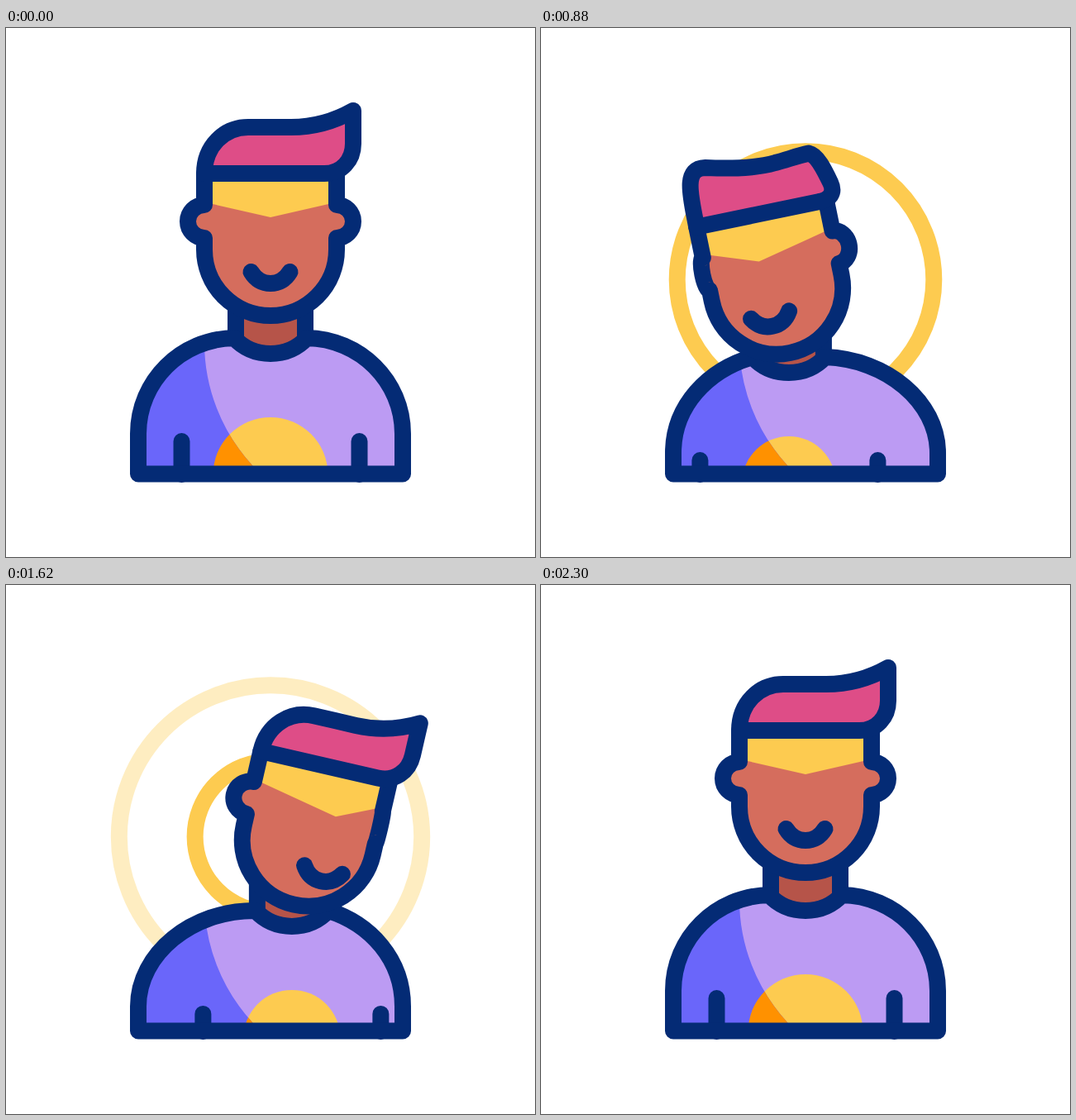
An HTML page for the animation above (2400 ms loop, 640 by 640 pixels).

```html
<!DOCTYPE html>
<html lang="en">
<head>
<meta charset="utf-8">
<title>Tilting figure</title>
<style>
  html, body { margin: 0; width: 100%; height: 100%; overflow: hidden; background: #fff; }
  svg { display: block; width: 100%; height: 100%; }
  .line { fill: none; stroke: #042b75; stroke-width: 20; stroke-linecap: round; stroke-linejoin: round; }
</style>
</head>
<body>
<svg viewBox="0 0 640 640">
  <defs>
    <clipPath id="bodyClip"><path id="bodyShape"/></clipPath>
    <clipPath id="shadeClip"><path d="M100 600V300H240V380A220 220 0 0 0 298 529L340 600Z"/></clipPath>
  </defs>
  <g id="rings" fill="none" stroke="#fdcb50" stroke-width="20">
    <circle cx="320" cy="304.5"/><circle cx="320" cy="304.5"/><circle cx="320" cy="304.5"/>
  </g>
  <g id="neck">
    <path fill="#b65449" d="M278 330V376C290 388 304 394 320 394S350 388 362 376V330Z"/>
    <path class="line" d="M278 335V375M362 335V375"/>
  </g>
  <g clip-path="url(#bodyClip)">
    <rect x="140" y="340" width="360" height="210" fill="#bc9bf3"/>
    <circle class="sun" fill="#fdcb50"/>
    <g clip-path="url(#shadeClip)">
      <rect x="140" y="340" width="160" height="210" fill="#6a66fa"/>
      <circle class="sun" fill="#ff9100"/>
    </g>
  </g>
  <path id="arms" class="line"/>
  <path id="bodyLine" class="line"/>
  <g id="head">
    <path id="face" fill="#d56d5d"/>
    <path id="fringe" fill="#fdcb50"/>
    <path id="faceLine" class="line"/>
    <path id="hair" class="line" style="fill:#de4d87"/>
    <path id="mouth" class="line" d="M296.5 295C302 304 310 309 320 309S338 304 343.5 295"/>
  </g>
</svg>
<script>
const LOOP = 2400;
const $ = id => document.getElementById(id);
const set = (el, attrs) => { for (const k in attrs) el.setAttribute(k, attrs[k]); };
const clamp = v => Math.min(1, Math.max(0, v));
const smooth = u => u * u * (3 - 2 * u);
const mix = (a, b, u) => a + (b - a) * u;

// torso x, y; head x, y, angle; hair sweep; ear depths; feature x, y
const rest  = [0, 0, 0, 0, 0, 0, 20, 20, 0, 0];
const left  = [-31, 24, -54, 48, -17.5, 1, 1, 20, -24, 3];
const right = [26, 19, 46, 40.8, 13, 0, 20, 1, 26, 4];
const over  = rest.map((v, i) => mix(v, right[i], -0.03));

// time, pose, power that delays the easing toward this pose
const keys = [[0, rest, 1], [600, left, 1.32], [1600, right, 1], [2080, over, 1], [2300, rest, 1], [LOOP, rest, 1]];

function poseAt(t) {
  let i = 1;
  while (i < keys.length - 1 && t > keys[i][0]) i++;
  const [t0, a] = keys[i - 1], [t1, b, power] = keys[i];
  const u = smooth(Math.pow(clamp((t - t0) / (t1 - t0)), power));
  return a.map((v, k) => mix(v, b[k], u));
}

// Hair outline as five cubic curves, upright and swept
const hairUp = [
  240, 143, 264, 120, 293, 120,   310, 120, 328, 120, 345, 120,
  372, 120, 397, 113, 420, 100,   420, 113, 420, 127, 420, 140,
  420, 160, 406, 176, 385, 176];
const hairSwept = [
  241, 140, 231, 99, 258, 105,    278, 111, 318, 122, 350, 119,
  362, 118, 373, 117, 384, 120,   396, 122, 402, 143, 407, 160,
  411, 172, 404, 177, 392, 176];

function torsoPath(x, y) {
  const lean = -x / 31;
  const ctrl = side => ({
    low: 427 + y * 1.2 + 4 * side * lean,
    high: 376 + y * 1.35 + 10 * side * lean
  });
  const l = ctrl(1), r = ctrl(-1);
  const top = 375 + y, base = 491 + y, half = x / 2;
  return `M160 539.5V${base}C160 ${l.low} ${212 + half} ${l.high} ${276 + x} ${top}` +
    `C${288 + x} ${388 + y} ${303 + x} ${394 + y} ${320 + x} ${394 + y}` +
    `S${352 + x} ${388 + y} ${364 + x} ${top}` +
    `C${428 + half} ${r.high} 480 ${r.low} 480 ${base}V539.5Z`;
}

function drawRings(t) {
  [...$('rings').children].forEach((ring, i) => {
    const age = t - 600 - i * 500;
    const gap = Math.max(0, 10.05 - 0.0161 * age);
    const r = 186 - gap * gap;
    const alpha = r > 0 && age < 640 ? clamp((649 - age) / 364) : 0;
    set(ring, { r: Math.max(0, r), opacity: alpha });
  });
}

function draw(t) {
  const [x, y, hx, hy, angle, sweep, earL, earR, fx, fy] = poseAt(t);
  drawRings(t);

  const torso = torsoPath(x, y);
  set($('bodyShape'), { d: torso });
  set($('bodyLine'), { d: torso });
  set($('neck'), { transform: `translate(${x} ${y})` });
  set($('arms'), { d: `M${212.5 + x} ${500 + y}V540M${427.5 + x} ${500 + y}V540` });

  // circle through its top and its width at the hem
  const rise = 58 - y, half = 68.5 - 0.7 * y;
  const r = (half * half + rise * rise) / (2 * rise);
  document.querySelectorAll('.sun').forEach(s => set(s, { cx: 320 + x, cy: 471 + y + r, r }));

  set($('head'), { transform: `translate(${hx} ${hy}) rotate(${angle} 320 268)` });
  const face = `M240 176V214A${earL} 20 0 0 0 240 254V268A80 80 0 0 0 400 268V254A${earR} 20 0 0 0 400 214V176`;
  set($('face'), { d: face });
  set($('faceLine'), { d: face });
  set($('fringe'), { d: `M245 176H395V211.9L390 213L${320 + fx} ${229 + fy}L250 213L245 211.9Z` });
  set($('mouth'), { transform: `translate(${fx} ${fy})` });
  set($('hair'), { d: 'M240 176C' + hairUp.map((v, i) => mix(v, hairSwept[i], sweep).toFixed(2)).join(' ') + 'Z' });
}

let start = null;
function tick(now) {
  if (start === null) start = now;
  draw((now - start) % LOOP);
  requestAnimationFrame(tick);
}
draw(0);
requestAnimationFrame(tick);
</script>
</body>
</html>
```
